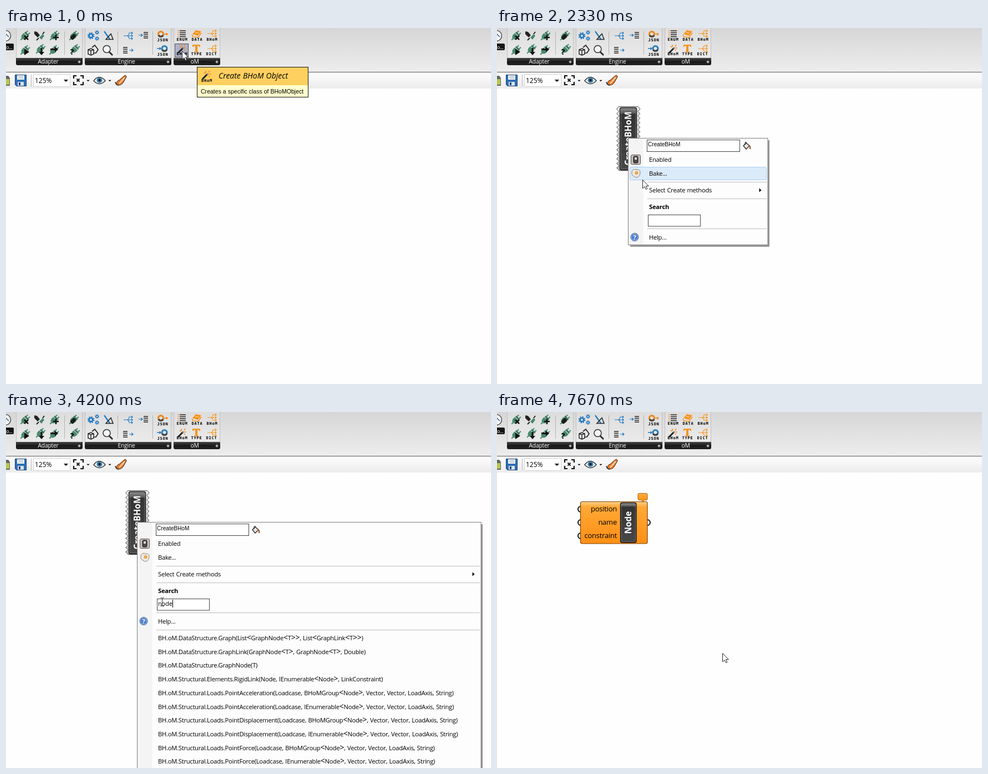
These frames come from a looping animation (874 by 641 pixels, 7.76 s). An HTML page:

```html
<!DOCTYPE html>
<html lang="en">
<head>
<meta charset="utf-8">
<title>Create a node</title>
<style>
  html, body { margin: 0; width: 100%; height: 100%; overflow: hidden; background: #fefefe; }
  svg { display: block; width: 874px; height: 641px; }
  text { font: 11.2px "Open Sans", "Noto Sans", sans-serif; letter-spacing: -.25px; word-spacing: .6px; }
  .bar text { font-size: 10.3px; letter-spacing: -.2px; fill: #fff; text-anchor: middle; }
  .tag text { font: bold 7px "DejaVu Sans Mono", monospace; letter-spacing: .8px; text-anchor: middle; }
  .mark text { font: bold 14px "Open Sans", sans-serif; letter-spacing: 0; text-anchor: middle; }
  .plain { font: 10.1px "Liberation Sans", Arial, sans-serif; letter-spacing: 0; word-spacing: 0; }
  .upright { font: bold 15.4px "Open Sans", sans-serif; letter-spacing: 0; fill: #fff; text-anchor: middle; }
  .ports text { font-size: 13px; text-anchor: end; }
  .angle { font-size: 14px; }
  .b { font-weight: bold; }
  .hide { display: none; }
</style>
</head>
<body>
<svg viewBox="0 0 874 641">
  <defs>
    <linearGradient id="ribbon" x2="0" y2="1"><stop stop-color="#d6d6d6"/><stop offset="1" stop-color="#ededed"/></linearGradient>
    <linearGradient id="panel" x2="0" y2="1"><stop stop-color="#dcdcdc"/><stop offset="1" stop-color="#ebebeb"/></linearGradient>
    <linearGradient id="tools" x2="0" y2="1"><stop stop-color="#fdfdfd"/><stop offset="1" stop-color="#ececec"/></linearGradient>
    <linearGradient id="black" x2="0" y2="1"><stop stop-color="#444"/><stop offset=".5" stop-color="#1a1a1a"/><stop offset="1" stop-color="#222"/></linearGradient>
    <linearGradient id="dark" x2="0" y2="1"><stop stop-color="#8c8c8c"/><stop offset=".09" stop-color="#5a5a5a"/><stop offset=".1" stop-color="#333"/><stop offset="1" stop-color="#484848"/></linearGradient>
    <linearGradient id="shell" x2="0" y2="1"><stop stop-color="#ececec"/><stop offset="1" stop-color="#b4b4b4"/></linearGradient>
    <linearGradient id="orange" x2="0" y2="1"><stop stop-color="#ffd28c"/><stop offset=".12" stop-color="#ffa836"/><stop offset="1" stop-color="#ff8f14"/></linearGradient>

    <g id="plug">
      <g transform="rotate(-45)">
        <path d="M-11 0h5" stroke="#478a6c" stroke-width="2"/>
        <path d="M-7 -2q2-3 6-3h3v10h-3q-4 0-6-3z" fill="#478a6c"/>
        <path d="M3-4.500h3v9h-3z" fill="#3b765c"/>
        <path d="M6-2.500h4M6 2.500h4" stroke="#478a6c" stroke-width="2"/>
      </g>
    </g>
    <g id="gear" fill="none" stroke="#1e78c2">
      <circle r="3.300" stroke-width="2.600"/>
      <circle r="5.300" stroke-width="2" stroke-dasharray="2.200 1.960"/>
    </g>
    <path id="branch" d="M-8 0h6M-2 0q3 0 4-5h6M-2 0h10M-2 0q3 0 4 5h6M6-7l2 2-2 2M6-2l2 2-2 2M6 3l2 2-2 2" fill="none" stroke-width="1.200"/>
    <path id="list" d="M-4-5h8M-4-1.700h8M-4 1.700h8M-4 5h8" stroke="#222" stroke-width="1.500"/>
    <path id="down" d="M-4-2h8l-4 4z"/>
    <path id="cross" d="M-2.500 0h5M0-2.500v5" stroke="#ddd" stroke-width="1.300"/>
    <g id="wand">
      <path d="M-6 7L3-2" stroke="#222" stroke-width="3"/>
      <path d="M2-1l2-2" stroke="#888" stroke-width="3"/>
      <path d="M-3-5l2 2M0-8v4M7-8l-2 3M9-2h-4M5 1l2 2" stroke="#f58a1f" stroke-width="1.600"/>
    </g>
  </defs>

  <rect width="874" height="641" fill="#fefefe"/>
  <rect width="874" height="79" fill="url(#ribbon)"/>
  <rect y="79" width="874" height="1" fill="#5c5c5c"/>
  <rect y="80" width="874" height="29" fill="url(#tools)"/>

  <!-- ribbon panels -->
  <g id="panels" class="bar"></g>
  <circle cx="-1" cy="14" r="9.500" fill="#f4f6f8" stroke="#555" stroke-width="1.600"/>
  <path d="M-1 10l6 6" stroke="#345a8a" stroke-width="1.500"/>
  <path d="M0 28h12q2 0 2 2v8q0 2-2 2H0z" fill="#151515"/>
  <text x="0" y="38" fill="#fff" style="font-size:9px">o...</text>
  <path d="M105.500 6v42M201.500 6v42M264.500 6v42" stroke="#b4b4b4"/>
  <rect id="press" x="304.500" y="28.500" width="24" height="24" fill="#aeb2c8" stroke="#4d5166"/>

  <!-- adapter icons -->
  <g>
    <use href="#plug" x="34" y="14"/><use href="#plug" x="87" y="14"/>
    <use href="#plug" x="34" y="40"/><use href="#plug" x="62" y="38"/><use href="#plug" x="86" y="40"/><use href="#plug" x="124" y="38"/>
    <path d="M51 6l5 1 5 6-4 4-6-6z" fill="#222"/>
    <path d="M60 17l6-6 3 3-5 7z" fill="#478a6c"/>
    <path d="M55 22l4-4M66 11l3-4" stroke="#222" stroke-width="2"/>
    <use href="#plug" x="122" y="14"/>
    <path d="M116 16l6-6 5 4-6 7q-5 1-5-5z" fill="#1c1c1c"/>
    <path d="M33 14l7 7M40 14l-7 7M90 12v10M85 17h10" stroke="#111" stroke-width="2.600"/>
    <path d="M33 37l9 6-9 6zM62.500 36h3v7h3.500l-5 6-5-6h3.500zM80 37h8v-3.500l6 5-6 5V40h-8z" fill="#111"/>
    <g class="mark"><text x="119" y="48">?</text></g>
  </g>

  <!-- engine icons -->
  <g>
    <use href="#gear" x="153" y="14"/>
    <use href="#gear" transform="translate(164 8) scale(.6)"/>
    <use href="#gear" transform="translate(164 19) scale(.6)"/>
    <path d="M177 6l10 14" stroke="#1e78c2" stroke-width="2.200"/>
    <path d="M180 20.500h13l-4-10z" fill="none" stroke="#222" stroke-width="1.500"/>
    <use href="#branch" x="220" y="14" stroke="#1e78c2"/>
    <use href="#list" x="252" y="13"/>
    <path d="M239 13h7M243 10.500l3 2.500-3 2.500" fill="none" stroke="#1e78c2" stroke-width="1.200"/>
    <path d="M148 39l5-2 5 2v8l-5 2-5-2zM148 39l5 2 5-2M153 41v8" fill="#eee" stroke="#222" stroke-width="1.500"/>
    <path d="M155 35l5-4 6 8-4 6h-4" fill="none" stroke="#222" stroke-width="1.700"/>
    <circle cx="181.500" cy="38" r="6.500" fill="#f1f5f8" stroke="#333" stroke-width="1.500"/>
    <path d="M186 43l6 6" stroke="#222" stroke-width="2.500"/>
    <use href="#list" x="215" y="40"/>
    <path d="M222 40h7M226 37.500l3 2.500-3 2.500" fill="none" stroke="#1e78c2" stroke-width="1.200"/>
    <g fill="none" stroke-width="3.200">
      <circle cx="279" cy="11" r="4.500" stroke="#e8871e"/><path d="M275 13a4.500 4.500 0 0 0 8 0" stroke="#444"/>
      <circle cx="285.500" cy="37" r="4.500" stroke="#2c7fb8"/><path d="M281.500 39a4.500 4.500 0 0 0 8 0" stroke="#444"/>
    </g>
    <path d="M285 11h6M288.500 9l2.500 2-2.500 2" fill="none" stroke="#e8871e" stroke-width="1.300"/>
    <path d="M272 37h7M276.500 35l2.500 2-2.500 2" fill="none" stroke="#1e78c2" stroke-width="1.300"/>
  </g>

  <!-- object icons -->
  <g>
    <path d="M313 5h11M313 8.500h11M313 12h11M313 15.500h11" stroke="#222" stroke-width="1.700"/>
    <path d="M309.500 5h2M309.500 8.500h2M309.500 12h2M309.500 15.500h2" stroke="#f58a1f" stroke-width="1.700"/>
    <path d="M336 11l6-7 10 2-6 8z" fill="#f7941d"/>
    <path d="M336 12q-1 4 2 4l8 1 6-8" fill="none" stroke="#f7941d" stroke-width="1.600"/>
    <path d="M341 8l6 1" stroke="#ffe3bd"/>
    <use href="#branch" x="371" y="10" stroke="#f7941d"/>
    <use href="#branch" x="371" y="37" stroke="#f7941d"/>
    <use href="#wand" x="316" y="38"/>
    <path d="M336 30h14v4h-1.500q-.5-2-2.500-2h-1v10h2v1.500h-8V42h2V32h-1q-2 0-2.500 2H336z" fill="#f7941d"/>
  </g>
  <g id="tags" class="tag"></g>

  <!-- canvas toolbar -->
  <g>
    <path d="M0 86h4l3 4v14H0z" fill="#666"/><path d="M0 92h6v10H0z" fill="#b9c84c"/>
    <path d="M16.500 84.500h20v20H19l-2.500-2.500z" fill="#2d6fb5" stroke="#173f70"/>
    <path d="M20 85h13v8H20z" fill="#f3f7fb"/><path d="M22 87.500h9M22 90h9" stroke="#9ab"/>
    <path d="M21 97h11v7H21z" fill="#d7e0ea"/><path d="M23 98h3v5h-3z" fill="#173f70"/>
    <path d="M45.500 84v21" stroke="#bbb"/>
    <rect x="49.500" y="83.500" width="66" height="22" fill="#fff" stroke="#d4d4d4"/>
    <text x="52" y="99" style="font-size:12px;letter-spacing:0">125%</text>
    <use href="#down" x="108" y="95"/>
    <path d="M122 91v-5h5M134 86h5v5M139 97v5h-5M127 102h-5v-5" fill="none" stroke="#111" stroke-width="2.200"/>
    <path d="M127.500 91.500l5 5M132.500 91.500l-5 5" stroke="#111" stroke-width="1.800"/>
    <use href="#down" transform="translate(148 95) scale(.65)"/>
    <path d="M158 95q10-13 21 0-11 11-21 0z" fill="#f5f9fc" stroke="#333" stroke-width="1.400"/>
    <circle cx="168.500" cy="94" r="5" fill="#3b83b5"/><circle cx="168.500" cy="94" r="2.300" fill="#111"/>
    <use href="#down" transform="translate(187 95) scale(.65)"/>
    <path d="M199 101q0-6 5-7l9-8q4-2 4 2l-5 9q-3 6-10 6z" fill="#e9792b" stroke="#3b2217"/>
    <path d="M204 100l10-11" stroke="#ffd9ae" stroke-width="2"/>
    <path d="M197 97q1 6 6 6" fill="none" stroke="#222" stroke-width="1.500"/>
  </g>

  <!-- tooltip -->
  <g id="tip">
    <rect x="344.500" y="70.500" width="200" height="54" fill="#ffffcc" stroke="#111"/>
    <rect x="345" y="71" width="199" height="32" fill="#ffd060"/>
    <use href="#wand" x="360" y="85"/>
    <g class="tag"><text x="362" y="97">BHoM</text></g>
    <text x="383" y="91" style="font-size:14px;font-style:italic;letter-spacing:0">Create BHoM Object</text>
    <text x="351" y="118" class="plain" style="font-size:10.550px">Creates a specific class of BHoMObject</text>
  </g>

  <!-- empty component -->
  <g id="blank">
    <path id="teeth" fill="url(#shell)" stroke="#555"/>
    <rect x="221.500" y="143.500" width="30" height="112" rx="3" fill="url(#dark)" stroke="#111" stroke-width="1.300"/>
    <rect x="223" y="145" width="27" height="109" rx="2" fill="none" stroke="#999" stroke-opacity=".6"/>
    <text class="upright" transform="translate(242 199) rotate(-90)">CreateBHoM</text>
  </g>

  <!-- finished component -->
  <g id="node">
    <g fill="#fff" stroke="#111" stroke-width="2">
      <circle cx="151" cy="175" r="5"/><circle cx="151" cy="199" r="5"/><circle cx="151" cy="223" r="5"/><circle cx="271" cy="199" r="5"/>
    </g>
    <rect x="150.500" y="161.500" width="120.500" height="75.500" rx="3" fill="url(#orange)" stroke="#7a4508" stroke-width="1.200"/>
    <path d="M256 146.500h13q2 0 2 2v8q0 2-2 2h-3.500l-2.500 4-2.500-4h-4.500q-2 0-2-2v-8q0-2 2-2z" fill="url(#orange)" stroke="#a65d10"/>
    <rect x="222.500" y="163.500" width="28.500" height="71.500" rx="3" fill="url(#dark)" stroke="#111" stroke-width="1.300"/>
    <rect x="224" y="165" width="25.500" height="68.500" rx="2" fill="none" stroke="#999" stroke-opacity=".5"/>
    <g class="ports"><text x="216" y="179">position</text><text x="216" y="203">name</text><text x="216" y="227">constraint</text></g>
    <text class="upright" transform="translate(242 199) rotate(-90)">Node</text>
  </g>

  <!-- context menu -->
  <g id="menu">
    <rect id="shade" x="240" y="202" rx="1" fill="#000" fill-opacity=".4"/>
    <rect id="sheet" x="236.500" y="198.500" fill="#fdfdfd" stroke="#7d7d7d"/>
    <rect id="gutter" x="237" y="199" width="26.500" fill="#f4f4f4"/>
    <rect id="hover" x="239.500" height="23" rx="2.500" fill="#dcebfa" stroke="#aecff7"/>
    <path id="rules" stroke="#bdbdbd"/>
    <rect x="270.500" y="201.500" width="167" height="21" fill="#fff" stroke="#444"/>
    <text x="272" y="213" class="plain">CreateBHoM</text>
    <path d="M444 212l5-5 6 5-6 6z" fill="#e8e8e8" stroke="#222" stroke-width="1.300"/>
    <path d="M447 211v-5q2-2 3 1" fill="none" stroke="#222"/>
    <path d="M453 211q4 1 3 7" fill="none" stroke="#a4502c" stroke-width="2.200"/>
    <rect x="241.500" y="228.500" width="17" height="17" rx="2" fill="#c9c1bb" stroke="#5a504b"/>
    <rect x="246" y="231" width="8" height="12" rx="1.500" fill="#4b4b4b" stroke="#111"/><path d="M248 233h4v4h-4z" fill="#ddd"/>
    <path d="M243 259q1-6 8-4 7-1 7 5 0 8-6 9-3 1-5-2-5-1-4-8z" fill="#eee7de" stroke="#8d8780"/>
    <circle cx="251.500" cy="261" r="2.600" fill="#f2b04a" stroke="#c9862e" stroke-width=".8"/>
    <circle cx="248" cy="376.500" r="7" fill="#4c7fd0" stroke="#44609a"/>
    <circle cx="248" cy="376.500" r="6" fill="none" stroke="#a9c3ea"/>
    <text x="248" y="381" class="b" fill="#fff" text-anchor="middle">?</text>
    <text x="274" y="241">Enabled</text>
    <text x="274" y="266">Bake...</text>
    <text x="274" y="296">Select Create methods</text>
    <path id="more" d="M0 288.500v7l4-3.500z"/>
    <text x="274" y="326" class="b">Search</text>
    <rect x="272.500" y="336.500" width="94" height="20.500" fill="#fff" stroke="#444"/>
    <text id="query" x="274" y="349"></text>
    <rect id="caret" y="338" width="1" height="14"/>
    <text x="274" y="381">Help...</text>
    <g id="hits"></g>
  </g>

  <path id="arrow" d="M.5.500V15.800L4 12.600 6.400 17.500 8.800 16.500 6.500 11.700H11.300Z" fill="#fff" stroke="#222"/>
  <g id="beam" stroke="#333">
    <path d="M-3-7.500h2.500M.5-7.500H3M-3 7.500h2.500M.5 7.500H3"/>
    <path id="stem" d="M0-7V7"/>
  </g>
</svg>
<script>
const LOOP = 7760;
const $ = id => document.getElementById(id);
const set = (el, attrs) => { for (const k in attrs) el.setAttribute(k, attrs[k]); return el; };
const add = (parent, tag, attrs, text = '') => {
  const el = set(document.createElementNS('http://www.w3.org/2000/svg', tag), attrs);
  el.textContent = text;
  return parent.appendChild(el);
};
const show = (id, on) => $(id).classList.toggle('hide', !on);
const latest = (list, t) => list.filter(e => e[0] <= t).pop();

// Static repeats
[['Adapter', 18, 138, 76], ['Engine', 142, 298, 217], ['oM', 302, 386, 340]].forEach(([name, l, r, mid]) => {
  const g = $('panels');
  add(g, 'path', { d: `M${l + .5} -2V54H${r - .5}V-2z`, fill: 'url(#panel)', stroke: '#c2c2c2' });
  add(g, 'path', { d: `M${l} 54H${r}v10q0 3-3 3H${l + 3}q-3 0-3-3z`, fill: 'url(#black)' });
  add(g, 'text', { x: mid, y: 64 }, name);
  add(g, 'use', { href: '#cross', x: r - 6, y: 61 });
});
[['JSON', 282, 24], ['JSON', 282, 50], ['ENUM', 317, 23], ['DATA', 344, 23], ['BHoM', 371, 23],
 ['BHoM', 317, 49], ['TYPE', 343, 49], ['DICT', 370, 49]].forEach(([s, x, y]) => add($('tags'), 'text', { x: x + .5, y }, s));

const TEETH = 14, pitch = 114 / TEETH;
const edge = (tip, root) => Array.from({ length: TEETH }, (_, i) =>
  [`L${tip} ${142 + pitch * (i + .5)}`, `L${root} ${142 + pitch * (i + 1)}`]).flat();
set($('teeth'), {
  d: `M219.500 141.500H254.500${edge(258, 253.5).join('')}V256.500H219.500${edge(215.5, 220).reverse().join('')}z`
});

// Search results
const data = s => 'BH.oM.DataStructure.' + s;
const load = s => 'BH.oM.Structural.Loads.Point' + s + ', Vector, Vector, LoadAxis, String)';
const pair = s => ['BHoMGroup', 'IEnumerable'].map(c => load(`${s}(Loadcase, ${c}<Node>`));
const graph = ['Graph(List<GraphNode<T>>, List<GraphLink<T>>)',
  'GraphLink(GraphNode<T>, GraphNode<T>, Double)', 'GraphNode(T)'].map(data);
const broad = [
  ...['DiscreetPoint(Int32, Int32, Int32)', 'DiscreetPoint(Point, Double)'].map(data),
  ...graph,
  ...['LocalData(Point, T)', 'PointMatrix(Double)', 'PointMatrix(List<LocalData<T>>, Double)',
    'Tree(Dictionary<String, Tree<T>>, String)',
    'Tree(IEnumerable<T>, IEnumerable<IEnumerable<String>>, String)'].map(data)
];
const narrow = [
  ...graph,
  'BH.oM.Structural.Elements.RigidLink(Node, IEnumerable<Node>, LinkConstraint)',
  ...pair('Acceleration'), ...pair('Displacement'), ...pair('Force')
];
const exact = [graph[2], 'BH.oM.Structural.Elements.Node(Point, String, Constraint6DOF)'];

// Angle brackets are set larger than the letters
function addHit(s, i) {
  const line = add($('hits'), 'text', { x: 274, y: 411 + i * 24.7 });
  s.split(/([<>]+)/).forEach((part, k) => add(line, 'tspan', k % 2 ? { class: 'angle' } : {}, part));
}

// [time, right, bottom, results]
const menus = [[0], [1920, 488, 391, []], [3790, 792, 700, broad], [3940, 856, 700, narrow],
  [4510, 632, 446, exact], [6130]];
// [time, typed text, caret x]
const typing = [[0, '', 274], [3710, 'n', 281], [3860, 'no', 287], [4030, 'nod', 294],
  [4110, 'node', 300], [4410, 'node(', 303]];
const blinks = [[0, 0], [2790, 1], [3320, 0], [3710, 1], [4970, 0], [5500, 1], [5970, 0]];
// [start, end, steps, x, y]
const moves = [[380, 1000, 9, 237, 199], [2160, 2560, 6, 287, 346], [3020, 3020, 1, 270, 346],
  [3090, 3090, 1, 281, 342], [5260, 5260, 1, 340, 372], [5360, 5360, 1, 398, 397],
  [5670, 5670, 1, 402, 417], [5730, 5730, 1, 405, 434], [7670, 7670, 1, 406, 434]];

function pointer(t) {
  let x = 317, y = 41;
  for (const [a, b, n, tx, ty] of moves) {
    if (t < a) break;
    const step = Math.min(n, Math.floor((t - a) / Math.max(1, b - a) * (n - 1)) + 1);
    const p = step / n, e = p * p * (3 - 2 * p);
    x += (tx - x) * e;
    y += (ty - y) * e;
  }
  return [Math.round(x), Math.round(y)];
}

const inside = (x, y, l, t, r, b) => x >= l && x < r && y >= t && y < b;

let current;
function layMenu(menu) {
  if (menu === current) return;
  current = menu;
  const [, right, bottom, items] = menu;
  show('menu', right);
  if (!right) return;
  const w = right - 237, h = bottom - 199;
  set($('shade'), { width: w, height: h });
  set($('sheet'), { width: w + .5, height: h });
  set($('gutter'), { height: h - 1 });
  set($('hover'), { width: right - 242 });
  set($('more'), { transform: `translate(${right - 15.5} 0)` });
  const lines = [277.5, 307.5, 361.5].concat(items.length ? 392.5 : []);
  set($('rules'), { d: lines.map(y => `M271 ${y}H${right - 2}`).join('') });
  $('hits').textContent = '';
  items.forEach(addHit);
}

function draw(t) {
  const [x, y] = pointer(t);
  const menu = latest(menus, t), open = !!menu[1];
  const [, typed, caretX] = latest(typing, t);
  const caretOn = latest(blinks, t)[1];
  layMenu(menu);
  show('tip', t < 380);
  show('press', inside(x, y, 304, 28, 329, 53));
  show('blank', t >= 1220 && t < 6130);
  show('node', t >= 6130);

  const beam = open && (inside(x, y, 272, 336, 367, 357) || inside(x, y, 271, 201, 438, 222));
  const row = open && t < 2790 && !beam && x > 238 && [225, 250, 280].find(top => inside(x, y, 0, top, 874, top + 25));
  show('hover', row);
  if (row) set($('hover'), { y: row + .5 });

  // The caret and the stem cancel out where they overlap
  const overlap = beam && caretOn && caretX === x;
  $('query').textContent = typed;
  set($('caret'), { x: caretX });
  show('caret', caretOn && !overlap);
  show('stem', !overlap);

  show('arrow', !beam);
  show('beam', beam);
  set($('arrow'), { transform: `translate(${x} ${y})` });
  set($('beam'), { transform: `translate(${x + .5} ${y})` });
}

const begin = performance.now();
(function tick() {
  draw((performance.now() - begin) % LOOP);
  requestAnimationFrame(tick);
})();
</script>
</body>
</html>
```
